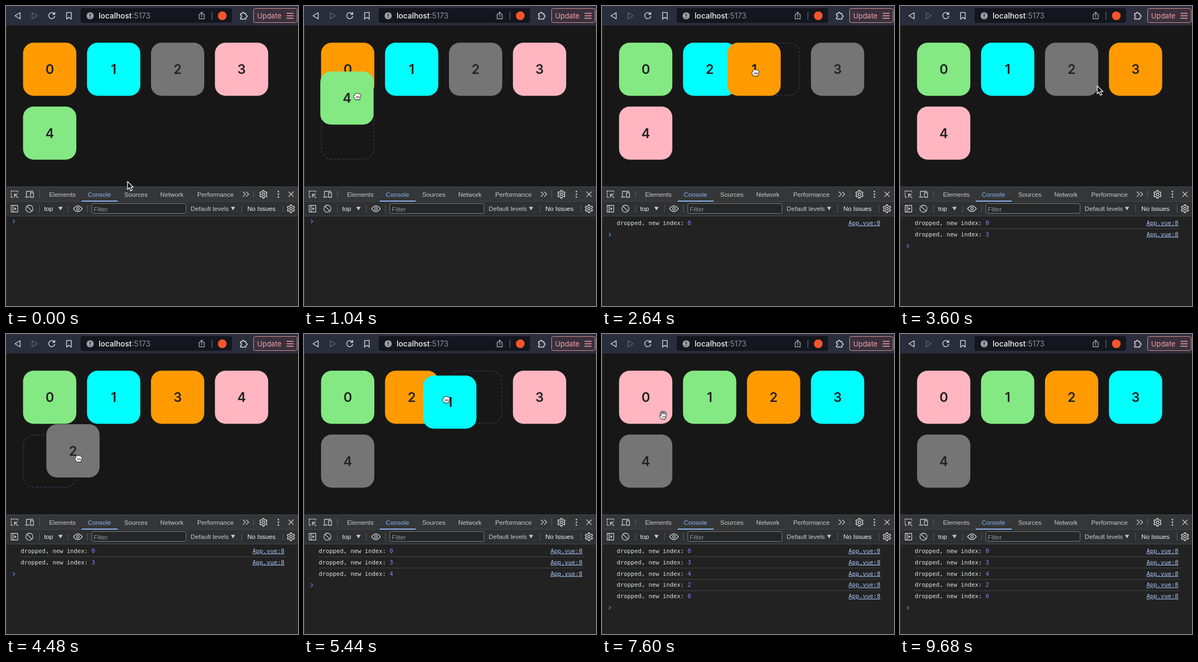
An HTML page for the animation above (9.76 s loop, 536 by 552 pixels).

```html
<!DOCTYPE html>
<html lang="en">
<head>
<meta charset="utf-8">
<title>Sortable tiles</title>
<style>
  html, body { margin: 0; width: 100%; height: 100%; overflow: hidden; background: #171717; }
  svg { display: block; width: 536px; height: 552px; }
  .bar text { font-family: Inter, sans-serif; }
  .tools text { font: 11.7px "Liberation Sans", Arial, sans-serif; fill: #c7c9cc; }
  .tools .on { fill: #8ab4f8; }
  .tools .lit { fill: #f2f2f2; }
  .line { fill: none; stroke: #e4e5ea; stroke-width: 1.3; stroke-linejoin: round; stroke-linecap: round; }
  .tools .line { stroke: #c7c9cc; }
  .tile text { font: 600 24px Inter, sans-serif; text-anchor: middle; fill: #222; }
  .log text { font: 10.8px "DejaVu Sans Mono", monospace; fill: #dfe1e4; white-space: pre; }
  .log .num { fill: #9980ff; }
  .log .link { fill: #a8c7fa; text-decoration: underline; }
</style>
</head>
<body>
<svg viewBox="0 0 536 552">
  <defs>
    <g id="gear" class="line">
      <circle r="2.3" stroke-width="1.2"/>
      <path id="tooth" d="M-1.700 -5l.5-2h2.400l.5 2 1.700 1 2-.6 1.200 2.100-1.500 1.400v2.200l1.500 1.400-1.200 2.100-2-.6-1.700 1-.5 2h-2.400l-.5-2-1.700-1-2 .6-1.200-2.100 1.500-1.400v-2.200l-1.500-1.400 1.200-2.100 2 .6z"/>
    </g>
  </defs>

  <rect width="536" height="552" fill="#171717"/>

  <g class="bar">
    <rect width="536" height="36" fill="#2a2d3b"/>
    <g class="line">
      <path d="M26 12.300v11.400L16.500 18z"/>
      <path d="M48 12.300v11.400L57.500 18z" style="stroke:#666977"/>
      <path d="M88.200 14a5.600 5.600 0 1 0 1.300 5"/>
      <path d="M89.800 11.500v4.300h-4.300z" fill="#e4e5ea" stroke-width=".5"/>
      <path d="M111.300 11.800h8.400v12.400l-4.200-3.400-4.200 3.400z"/>
    </g>
    <rect x="137" y="4" width="278" height="27" rx="4" fill="#14161e"/>
    <circle cx="154.500" cy="18" r="6.600" fill="#9b9da4"/>
    <path d="M154.500 14.200v4.500M154.500 20.500v1.500" stroke="#14161e" stroke-width="1.600"/>
    <text x="170" y="23" font-size="14" font-weight="500" fill="#f3f3f5">localhost<tspan font-weight="400" fill="#8d8f97">:5173</tspan></text>
    <path class="line" style="stroke:#a5a7ae" d="M356.500 15.500h-2v8h9.400v-8h-2M359.200 20v-8.500M356.700 13.700l2.500-2.500 2.500 2.500"/>
    <path d="M378 10.500v15" stroke="#777a83"/>
    <circle cx="397" cy="18" r="8" fill="#f4552c"/>
    <path class="line" d="M430.500 14h3.200c-1-3.500 4.300-3.500 3.400 0h3.400v3.200c3.200-1 3.200 4 0 3.200V24h-10v-3.300c3 .7 3-4 0-3.200z"/>
    <rect x="454.500" y="4.500" width="80" height="26" rx="3" fill="#3a303d" stroke="#d99496"/>
    <text x="461" y="22.500" font-size="13" fill="#f2a3a5">Update</text>
    <path d="M515 13.500h13M515 18h13M515 22.500h13" stroke="#f2a3a5" stroke-width="1.300"/>
  </g>

  <rect id="gap" width="96" height="96" rx="19" fill="none" stroke="#2f3045" stroke-width="1.700" stroke-dasharray="4.500 3"/>
  <g id="tiles"></g>

  <g class="tools">
    <rect y="333" width="536" height="219" fill="#222"/>
    <rect y="333" width="536" height="27" fill="#353637"/>
    <rect y="360" width="536" height="26" fill="#2f3031"/>
    <path d="M0 332.500h536M0 359.500h536M0 386.500h536" stroke="#454648"/>
    <path d="M61.500 339v14M454.500 339v14M61.500 366v14M114.500 366v14M149.500 366v14M432.500 366v14M508.500 366v14" stroke="#56585b"/>
    <rect x="139" y="358" width="66" height="2" fill="#8ab4f8"/>

    <path class="line" d="M9.500 340.500h12v4M9.500 340.500v11.500h4" stroke-dasharray="2 2"/>
    <path class="line" d="M22 353l-5.500-5.500M15.500 352v-5.500h5.500"/>
    <path class="line" d="M37.500 350v-9h12M35.500 351.500h7M45 343.500h5.500v8.500H45z"/>
    <text x="79" y="351">Elements</text>
    <text x="150" y="351" class="on">Console</text>
    <text x="217" y="351">Sources</text>
    <text x="283" y="351">Network</text>
    <text x="351" y="351">Performance</text>
    <path class="line" d="M435 342l4.500 4.300-4.500 4.300M441 342l4.500 4.300-4.500 4.300"/>
    <use href="#gear" x="472.500" y="346.500"/>
    <g fill="#c7c9cc"><circle cx="500" cy="341.500" r="1.400"/><circle cx="500" cy="346.500" r="1.400"/><circle cx="500" cy="351.500" r="1.400"/></g>
    <path class="line" d="M519 342l8.500 8.500M527.500 342l-8.500 8.500"/>

    <path class="line" d="M9.500 367h12v12h-12zM13 367v12"/>
    <path d="M15.500 370l4 3-4 3z" fill="#c7c9cc"/>
    <circle class="line" cx="43" cy="373" r="6.500"/>
    <path class="line" d="M38.500 368.500l9 9"/>
    <text x="70" y="377" class="lit">top</text>
    <path d="M96 369.500h8l-4 6.500zM413 369.500h7.500l-3.700 6.500z" fill="#c7c9cc"/>
    <path class="line" d="M124 373q8-10.500 16 0q-8 10.500-16 0z"/>
    <circle class="line" cx="132" cy="373" r="2.300"/>
    <rect x="157.500" y="363.500" width="173" height="18" rx="3" fill="#252627" stroke="#77797c"/>
    <text x="161" y="377.500" style="fill:#929498">Filter</text>
    <text x="339" y="377">Default levels</text>
    <text x="443" y="377" class="lit">No Issues</text>
    <use href="#gear" x="523" y="373"/>
  </g>

  <g id="logs"></g>
  <path id="prompt" d="M12.500 -3.300l3.600 3.300-3.600 3.300" fill="none" stroke="#4b80c8" stroke-width="1.400"/>
  <path d="M.5 36v516" stroke="#39393b"/>

  <g id="cursor" stroke-linejoin="round" stroke-linecap="round">
    <path id="arrow" d="M0 0v14.500l3.400-3.200 2.500 5.900 2.700-1.200-2.500-5.700h4.600z" fill="#111" stroke="#f4f4f4" stroke-width="1.300"/>
    <g id="hand" fill="#fff" stroke="#111">
      <path d="M-3 7.500C-5 4-7 2-6.500 .8c.7-1.400 2.500 0 3 1L-5-4c-.3-2 1.700-2.300 2.200-.6L-1.800-1.500l-.5-5c0-1.700 2.200-1.700 2.400 0l.4 4.800L1.600-6c.4-1.600 2.400-1.200 2.100.5L3.200-.8l1.500-2.700c.8-1.400 2.500-.6 2 1L5.200 3.500C4.800 5 4.500 6 4.200 7.500z"/>
      <path d="M-1 2v3M1.200 2v3M3.300 2v3" fill="none" stroke-width=".8"/>
    </g>
    <g id="fist" fill="#fff" stroke="#111">
      <path d="M-3.500 6.500C-4 4.500-6.700 3-6.500 .5c.1-1.400 1.300-1.500 2-1.200C-5.500-4-3.300-5.300-2-4c.6-1.700 2.700-1.700 3.200-.2C2.200-5.200 4-4.800 4.200-3.300c1.500-.6 2.500.3 2.500 1.800C6.700 2 5 4 4.700 6.500z"/>
      <path d="M-1.500 .5v3M.9.500v3M3.300.5v3" fill="none"/>
    </g>
  </g>
</svg>

<script>
const LOOP = 9760, STEP = 80, SIZE = 97.8, PITCH = 117.4;
const COLORS = ['#ff9b00', '#00ffff', '#757575', '#ffb6c1', '#84e982'];

// pointer way points: time, x, y
const PATH = [
  [0, 223, 323], [160, 223, 323], [560, 101, 233], [720, 99, 230],
  [1200, 104, 140], [1680, 167, 130], [1840, 160, 126],
  [2320, 200, 122], [2800, 325, 122], [3280, 432, 122],
  [3600, 362, 147], [3840, 325, 130], [4320, 180, 210], [4720, 90, 242],
  [5160, 191, 111], [5440, 261, 120], [5920, 310, 118],
  [6320, 363, 148], [6560, 455, 146], [7040, 250, 145], [7440, 110, 147],
  [7600, 112, 149], [8100, 112, 149], [8800, 570, 260]
];

// each drag: grab and drop time, first slot, then [time, slot] while moving
const DRAGS = [
  { grab: 720, drop: 1840, from: 4, moves: [[1120, 0]] },
  { grab: 2320, drop: 3280, from: 1, moves: [[2640, 2], [3040, 3]] },
  { grab: 3840, drop: 4720, from: 2, moves: [[4080, 1], [4480, 4]] },
  { grab: 5160, drop: 5920, from: 1, moves: [[5440, 2]] },
  { grab: 6560, drop: 7440, from: 3, moves: [[6800, 2], [7040, 1], [7280, 0]] }
];

const $ = id => document.getElementById(id);
const place = (el, x, y) => el.setAttribute('transform', `translate(${x} ${y})`);
const show = (el, on) => { el.style.display = on ? '' : 'none'; };
const slotAt = i => [31.3 + i % 4 * PITCH, 67.5 + (i > 3 ? PITCH : 0)];
const lastSlot = d => d.moves[d.moves.length - 1][1];

function group(parent, cls, html) {
  const g = document.createElementNS('http://www.w3.org/2000/svg', 'g');
  g.setAttribute('class', cls);
  g.innerHTML = html;
  return parent.appendChild(g);
}

const tiles = COLORS.map(c => group($('tiles'), 'tile',
  `<rect width="${SIZE}" height="${SIZE}" rx="19.600" fill="${c}"/><text x="49" y="57.800"></text>`));

const logs = DRAGS.map((d, i) => {
  const y = 403 + i * 20.8;
  const rule = i ? `<path d="M27 ${y - 14}H514" stroke="#414345"/>` : '';
  return group($('logs'), 'log', `${rule}<text x="27" y="${y}">dropped, new index: <tspan class="num">${lastSlot(d)}</tspan></text>` +
    `<text x="452.500" y="${y}" class="link">App.vue:8</text>`);
});

function reorder(list, from, to) {
  const out = list.slice();
  out.splice(to, 0, out.splice(from, 1)[0]);
  return out;
}

// cubic Hermite curve through the way points
function pointer(t) {
  const last = PATH.length - 1;
  if (t <= 0) return PATH[0].slice(1);
  if (t >= PATH[last][0]) return PATH[last].slice(1);
  const i = PATH.findIndex(p => p[0] > t) - 1;
  const a = PATH[i], b = PATH[i + 1], span = b[0] - a[0], u = (t - a[0]) / span;
  const speed = (n, k) => {
    const p = PATH[Math.max(n - 1, 0)], q = PATH[Math.min(n + 1, last)];
    const here = PATH[n][k];
    return (here - p[k]) * (q[k] - here) <= 0 ? 0 : (q[k] - p[k]) / (q[0] - p[0]);
  };
  return [1, 2].map(k => {
    const s = u * u * (3 - 2 * u);
    return a[k] + (b[k] - a[k]) * s +
      span * u * (1 - u) * ((1 - u) * speed(i, k) - u * speed(i + 1, k));
  });
}

const overTile = ([x, y]) => COLORS.some((c, i) => {
  const [sx, sy] = slotAt(i);
  return x > sx && x < sx + SIZE && y > sy && y < sy + SIZE;
});

function draw(t) {
  const done = DRAGS.filter(d => t >= d.drop);
  const drag = DRAGS.find(d => t >= d.grab && t < d.drop);
  const base = done.reduce((o, d) => reorder(o, d.from, lastSlot(d)), [0, 1, 2, 3, 4]);
  const [x, y] = pointer(t);
  let order = base, held = -1;

  if (drag) {
    const slot = drag.moves.reduce((s, m) => t >= m[0] ? m[1] : s, drag.from);
    order = reorder(base, drag.from, slot);
    held = base[drag.from];
    const [gx, gy] = slotAt(slot);
    place($('gap'), gx + 0.9, gy + 0.9);
  }
  show($('gap'), drag);

  tiles.forEach((tile, c) => {
    let [tx, ty] = slotAt(order.indexOf(c));
    if (c === held) {
      const [px, py] = pointer(drag.grab), [sx, sy] = slotAt(drag.from);
      tx = sx + x - px;
      ty = sy + y - py;
    }
    place(tile, tx, ty);
    tile.lastChild.textContent = base.indexOf(c);
  });
  if (held >= 0 && $('tiles').lastChild !== tiles[held]) $('tiles').append(tiles[held]);

  logs.forEach((el, i) => show(el, i < done.length));
  place($('prompt'), 0, done.length ? 400 + done.length * 20.75 : 396.3);

  // the hover shape lags the pointer by one step
  const kind = drag ? 'fist' : overTile(pointer(t - STEP)) ? 'hand' : 'arrow';
  for (const id of ['arrow', 'hand', 'fist']) show($(id), id === kind);
  place($('cursor'), x, y);
}

function tick() {
  draw(Math.floor(performance.now() % LOOP / STEP) * STEP);
  requestAnimationFrame(tick);
}
tick();
</script>
</body>
</html>
```
